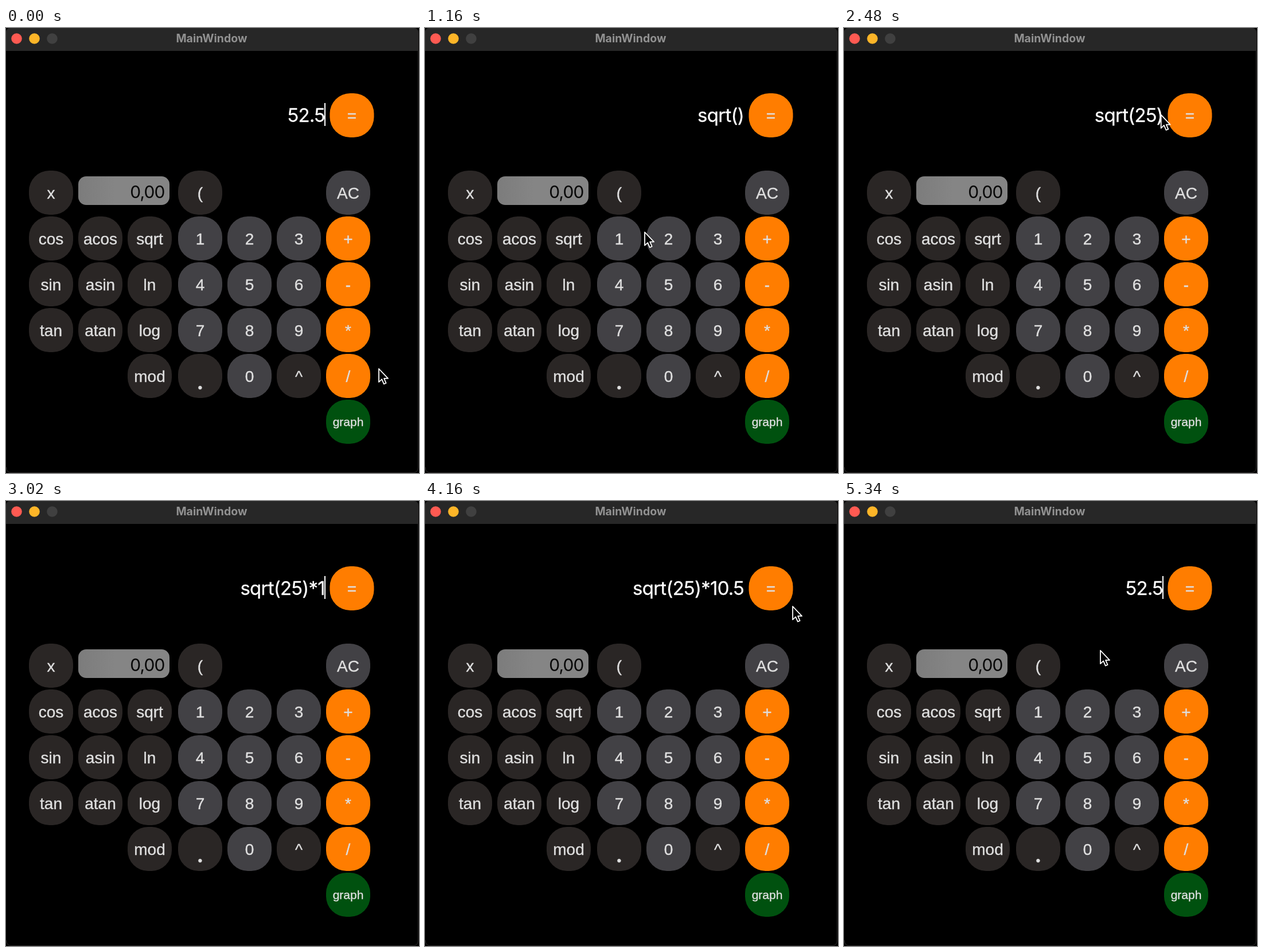
An HTML page for the animation above (5.36 s loop, 720 px wide and 777 px high).

```html
<!DOCTYPE html>
<html lang="en">
<head>
<meta charset="utf-8">
<title>Calculator</title>
<style>
  html, body { margin: 0; width: 100%; height: 100%; overflow: hidden; background: #000; }
  svg { display: block; width: 720px; height: 777px; }
  text { font-family: "Liberation Sans", Arial, sans-serif; font-size: 28px; fill: #dfdfdf; }
  .mid { text-anchor: middle; }
  .label { stroke: #dfdfdf; stroke-width: 0.4px; }
  .title { font: 700 19.5px Inter, sans-serif; fill: #919191; }
  .display { font: 400 33px Inter, sans-serif; letter-spacing: -0.75px; fill: #fff; stroke: #fff; stroke-width: 0.3px; text-anchor: end; }
  .field { font: 400 30px Inter, sans-serif; letter-spacing: -0.9px; fill: #080808; text-anchor: end; }
  .dot { font: 400 48px Lato, sans-serif; }
  .small { font-size: 21px; }
</style>
</head>
<body>
<svg viewBox="0 0 720 777">
  <defs>
    <linearGradient id="shade">
      <stop offset="0" stop-color="#7c7c7c"/>
      <stop offset="0.4" stop-color="#858585"/>
    </linearGradient>
  </defs>
  <rect width="720" height="777"/>
  <path d="M0 40V8Q0 0 8 0H711Q719 0 719 8V40Z" fill="#272727"/>
  <path d="M718.5 8V767Q718.5 776.5 709 776.5H10Q0.5 776.5 0.5 767" fill="none" stroke="#2c2a2a"/>
  <circle cx="18.5" cy="18.5" r="9.3" fill="#ff5a52"/>
  <circle cx="49.5" cy="18.5" r="9.3" fill="#fdb528"/>
  <circle cx="80.5" cy="18.5" r="9.3" fill="#404040"/>
  <text class="title mid" x="358.5" y="24.5">MainWindow</text>
  <rect x="126" y="259" width="159" height="50" rx="14" fill="url(#shade)"/>
  <text class="field" x="276.5" y="296.5">0,00</text>
  <g id="keys"></g>
  <text id="display" class="display" x="556" y="164"></text>
  <rect id="caret" x="555" y="131" width="2" height="40" fill="#fff"/>
  <path id="pointer" d="M1 1V24.2L6.2 19.3L9.8 27.6L13.6 26L10.1 17.9H17Z"
        fill="#000" stroke="#fff" stroke-width="1.8" stroke-linejoin="round"/>
</svg>
<script>
const LOOP = 5360;
const DWELL = 60;
const BLINK = 400;
const NS = "http://www.w3.org/2000/svg";
const $ = id => document.getElementById(id);
const COLORS = { dark: "#2a2625", grey: "#424145", orange: "#ff7d00", green: "#00510f" };
const ROWS = [
  ["x", "", "", "(", "", "", "AC"],
  ["cos", "acos", "sqrt", "1", "2", "3", "+"],
  ["sin", "asin", "ln", "4", "5", "6", "-"],
  ["tan", "atan", "log", "7", "8", "9", "*"],
  ["", "", "mod", ".", "0", "^", "/"],
  ["", "", "", "", "", "", "graph"]
];
const centers = {};

function add(tag, attrs, label) {
  const el = document.createElementNS(NS, tag);
  for (const name in attrs) el.setAttribute(name, attrs[name]);
  if (label) el.textContent = label;
  $("keys").append(el);
}

function kind(label) {
  if (label === "graph") return "green";
  if ("=+-*/".includes(label)) return "orange";
  return label === "AC" || /^\d$/.test(label) ? "grey" : "dark";
}

function addKey(label, cx, cy) {
  centers[label] = [cx, cy];
  add("rect", { x: cx - 38.5, y: cy - 38.5, width: 77, height: 77, rx: 35.5, fill: COLORS[kind(label)] });
  let style = "label mid", base = 10;
  if (label === ".") { style += " dot"; base = 23.5; }
  if (label === "graph") { style += " small"; base = 7.5; }
  add("text", { class: style, x: cx, y: cy + base }, label);
}

ROWS.forEach((row, r) => row.forEach((label, c) => {
  // the number pad is set off by a slightly wider gap
  if (label) addKey(label, 78.5 + 86 * c + (c > 2 ? 2 : 0), 287.5 + 80 * r);
}));
addKey("=", 603, 152.5);

const press = (time, key) => {
  const [x, y] = centers[key];
  return { time, key, x, y: y - 12 };
};
const rest = (time, x, y) => ({ time, x, y });

const stops = [
  rest(0, 649, 594),
  press(300, "AC"), press(850, "sqrt"), press(1340, "2"), press(1760, "5"),
  rest(2560, 552, 150), rest(4160, 640, 183),
  press(4500, "="),
  rest(5300, 446, 260)
];
const typed = [..."*10.5"].map((key, i) => ({ time: 2640 + 270 * i, key }));
const edits = [...stops.filter(s => s.key), ...typed].sort((a, b) => a.time - b.time);
const isTyping = t => t > 2600 && t < 3960;

function enter(text, key) {
  if (key === "AC") return "";
  if (key === "=") return "52.5";
  if (key === "sqrt") return text + "sqrt()";
  if (/\d/.test(key) && text.endsWith(")")) return text.slice(0, -1) + key + ")";
  return text + key;
}

function pointerAt(t) {
  const i = stops.findLastIndex(s => s.time <= t);
  const a = stops[i], b = stops[i + 1] || a;
  const span = b.time - a.time - 2 * DWELL;
  const u = Math.min(1, Math.max(0, (t - a.time - DWELL) / Math.max(1, span)));
  const k = u * u * (3 - 2 * u);
  return [a.x + (b.x - a.x) * k, a.y + (b.y - a.y) * k];
}

function draw() {
  const t = performance.now() % LOOP;
  const done = edits.filter(e => e.time <= t);
  const text = done.reduce((value, e) => enter(value, e.key), "52.5");
  const since = t - (done.length ? done[done.length - 1].time : 0);
  const caretOn = !text.endsWith(")") && since % (2 * BLINK) < BLINK;

  $("display").textContent = text;
  $("caret").style.opacity = caretOn ? 1 : 0;
  $("pointer").style.opacity = isTyping(t) ? 0 : 1;
  $("pointer").setAttribute("transform", `translate(${pointerAt(t)})`);
  requestAnimationFrame(draw);
}
draw();
</script>
</body>
</html>
```
